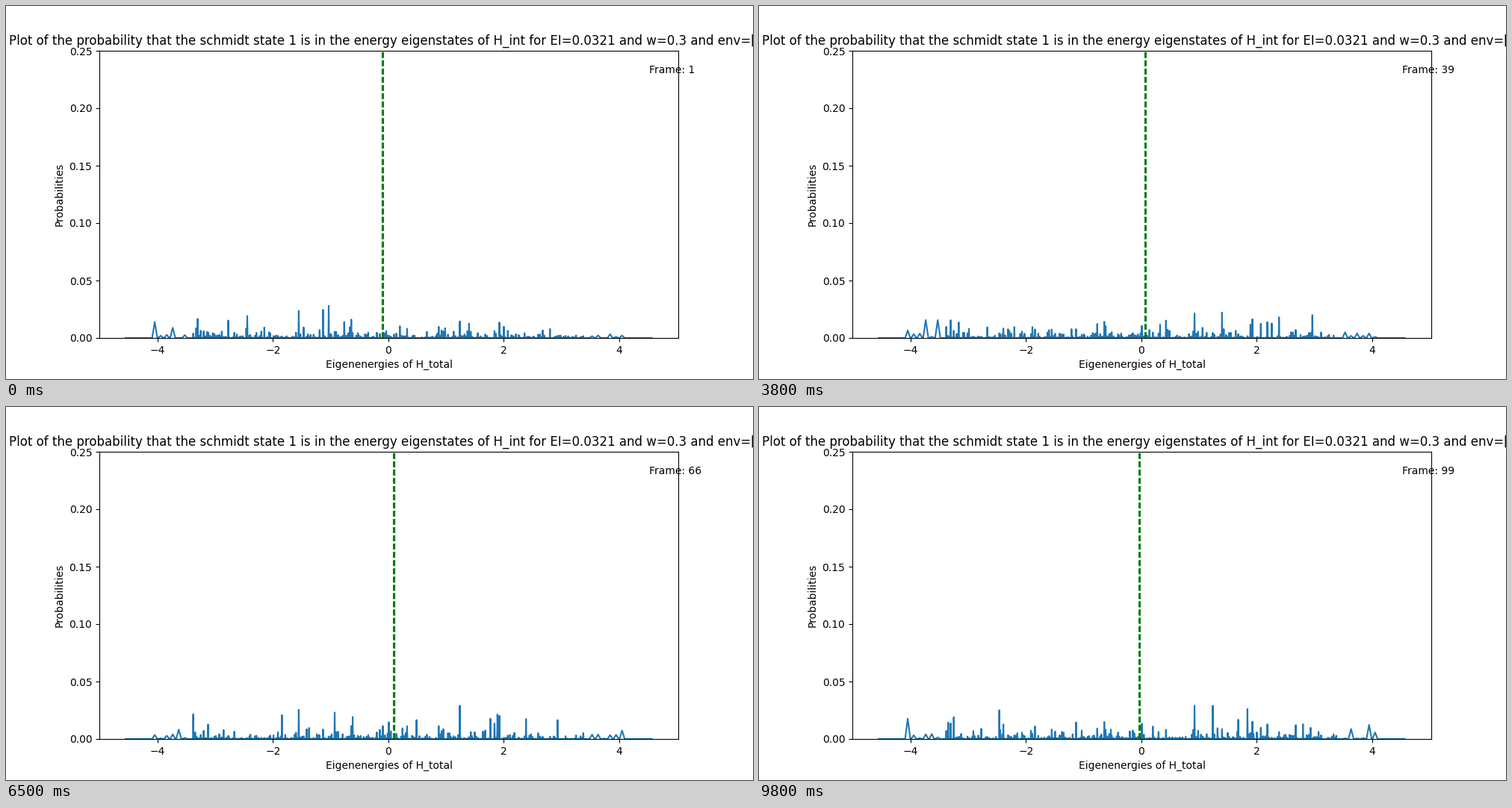
Animation, 1000 px wide and 500 px high, one loop 9.9 s. Source, as a matplotlib script:

```python
import matplotlib.pyplot as plt
import numpy as np
from matplotlib.animation import FuncAnimation

FRAMES, INTERVAL = 99, 100
BAND = (-4.555, 4.567)
INNER, MODES = 260, 5

# Levels: a dense jittered interior and a few sparse ones at both band edges.
rng = np.random.default_rng(12)
inner = np.linspace(-3.38, 3.38, INNER) + rng.uniform(-.006, .006, INNER)
edge = np.linspace(3.53, 4.05, 6)
levels = np.concatenate([-edge[::-1], inner, edge])
is_edge = np.abs(levels) > 3.45

# Each level is a spike that falls to zero on both sides.
half_width = np.where(is_edge, .045, .006)
x = np.column_stack([levels - half_width, levels, levels + half_width]).ravel()
x = np.concatenate([BAND[:1], x, BAND[1:]])

strength = np.where(is_edge, .004, .003 * rng.exponential(size=levels.size))
speed = rng.uniform(-.25, .25, (MODES, levels.size))
phase = rng.uniform(0, 2 * np.pi, (MODES, levels.size))

# The mean energy drifts between a few key points.
MOMENTS = [0, 22, 38, 49, 65, 86, 98]
MEANS = [-.10, .062, .070, -.235, .10, -.04, -.027]


def mean_energy(i):
    k = min(np.searchsorted(MOMENTS, i, side="right") - 1, len(MOMENTS) - 2)
    u = (i - MOMENTS[k]) / (MOMENTS[k + 1] - MOMENTS[k])
    u = (1 - np.cos(np.pi * u)) / 2
    return MEANS[k] * (1 - u) + MEANS[k + 1] * u


def mean_spread(i):
    return .006 + .052 * np.exp(-((i - 49) / 5) ** 2)


def probabilities(i):
    """Beating modes make every level rise and fall at its own pace."""
    waves = np.exp(1j * (speed * i + phase)).sum(axis=0)
    heights = np.minimum(strength * np.abs(waves) ** 2 / MODES, .029)
    y = np.zeros_like(x)
    y[2:-1:3] = heights
    return y


fig, ax = plt.subplots(figsize=(10, 5), dpi=100)
ax.set_xlim(-5.0095, 5.0245)
ax.set_ylim(0, .25)
ax.set_xlabel("Eigenenergies of H_total")
ax.set_ylabel("Probabilities")
ax.set_title("Plot of the probability that the schmidt state 1 is in the energy "
             "eigenstates of H_int for EI=0.0321 and w=0.3 and env=[0]")
spectrum, = ax.plot([], [])
center = ax.axvline(0, color="blue", linestyle="--")
sides = [ax.axvline(0, color="green", linestyle="--") for _ in range(2)]
label = ax.text(.95, .95, "", transform=ax.transAxes, va="top")


def update(i):
    spectrum.set_data(x, probabilities(i))
    mean, spread = mean_energy(i), mean_spread(i)
    center.set_xdata([mean, mean])
    for line, sign in zip(sides, (-1, 1)):
        line.set_xdata([mean + sign * spread] * 2)
    label.set_text(f"Frame: {i + 1}")
    return spectrum, center, *sides, label


anim = FuncAnimation(fig, update, frames=FRAMES, interval=INTERVAL, repeat=True)
plt.show()
```
